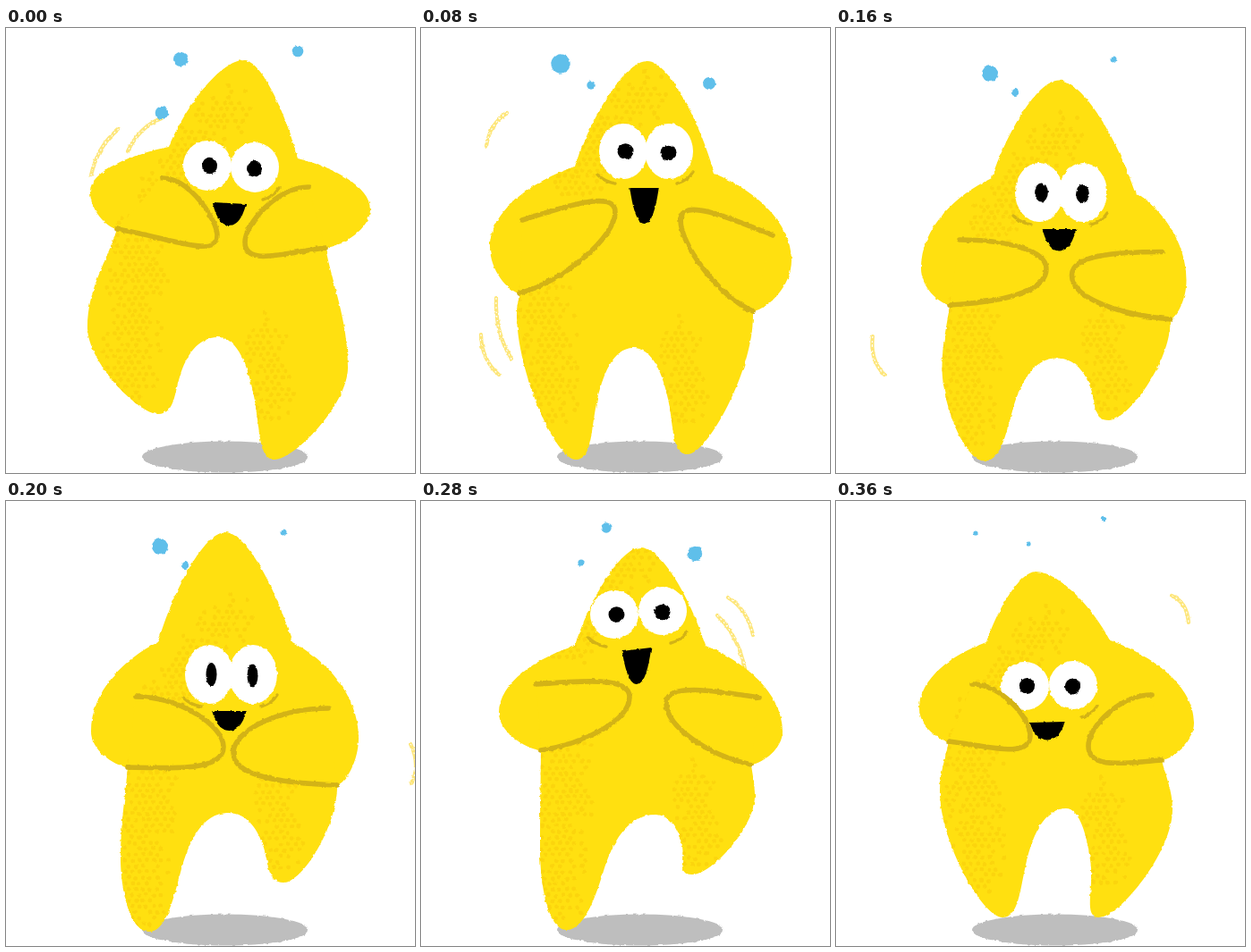
These frames come from a looping animation (457x498 px, 0.4 s). An HTML page:

```html
<!DOCTYPE html>
<html lang="en">
<head>
<meta charset="utf-8">
<title>Dancing star</title>
<style>
  html, body { margin: 0; width: 100%; height: 100%; overflow: hidden; background: #fff; }
  svg { display: block; width: 457px; height: 498px; }
  .flesh { fill: #ffe010; }
  .dots { fill: none; stroke: #fbd50d; stroke-width: 4.8; stroke-linecap: round; }
  .white { fill: #fff; }
  .black { fill: #000; }
  .line { fill: none; stroke: #d3b316; stroke-width: 5.6; stroke-linecap: round; stroke-linejoin: round; }
  .cheek { stroke-width: 3.4; }
  .drop { fill: #5fbfea; }
  .swish { fill: none; stroke: #fde67a; stroke-width: 4.2; stroke-linecap: round; }
  .core { fill: none; stroke: #fff; stroke-width: 1.2; stroke-dasharray: 2 3; }
</style>
</head>
<body>
<svg id="stage" viewBox="0 0 457 498">
  <filter id="rough" filterUnits="userSpaceOnUse" x="0" y="0" width="457" height="498" color-interpolation-filters="sRGB">
    <feTurbulence type="fractalNoise" baseFrequency=".2" numOctaves="2" seed="4"/>
    <feDisplacementMap in="SourceGraphic" scale="3" xChannelSelector="R" yChannelSelector="G"/>
  </filter>
  <g id="art" filter="url(#rough)">
    <ellipse cx="245" cy="480" rx="93" ry="17.5" fill="#bebebe"/>
  </g>
</svg>
<script>
const STEP = 40, COUNT = 10;
const art = document.getElementById('art');
const nums = s => s.split(/[ ,]+/).map(Number);
const points = s => s.split(' ').map(nums);

// mid: head tip, arch between the legs.
// left, right: shoulder, elbow, waist, hip, foot, start of hand line, fingertips, eye.
// face: eye height, pupil width, mouth depth.
const pose = (mid, left, right, face) => [points(mid), points(left), points(right), nums(face)];
const keys = {
  0: pose('266,36 237,346',
    '182,133 94,183 124,225 91,335 170,432 175,168 236,232 225,154',
    '326,146 407,203 357,246 382,380 300,483 338,178 267,240 278,156', '28 8.5 25'),
  2: pose('253,37 237,358',
    '172,155 77,245 110,297 107,320 173,483 113,215 217,206 226,138',
    '328,163 414,260 371,317 371,322 298,477 393,232 290,215 277,138', '31 9 40'),
  3: pose('253,82 246,390',
    '178,178 95,280 118,322 109,360 172,487 131,255 227,264 227,174',
    '348,209 389,300 377,334 377,338 300,451 369,269 273,271 276,174', '33 8.7 27'),
  5: pose('245,35 248,349',
    '170,158 95,258 136,298 128,400 160,482 145,219 243,275 227,194',
    '320,158 394,265 370,318 370,320 310,427 360,232 254,282 276,194', '33 6 22'),
  7: pose('246,52 262,351',
    '172,162 87,237 134,279 133,390 163,480 129,205 233,219 216,127',
    '318,162 404,258 369,295 373,330 303,418 378,220 274,226 270,123', '27 9 39'),
  8: pose('241,76 242,361',
    '162,183 82,270 122,321 120,385 162,480 133,242 229,268 214,167',
    '307,175 403,288 367,334 367,338 307,452 369,258 270,272 267,164', '27 9 30'),
  9: pose('223,79 257,344',
    '168,158 93,232 126,269 116,325 186,466 152,205 217,262 211,207',
    '306,156 400,248 364,290 376,345 294,466 353,217 282,274 265,206', '27 8.7 20')
};

// Drops hold for two steps: x, y, radius.
const drops = [
  '195,35,8 326,26,6.3 174,95,7.3',
  '156,40,10.7 190,64,4.7 322,62,7',
  '172,51,9 200,72,4 310,35,3.5',
  '207,30,5.7 179,69,3.6 306,59,8.2',
  '156,36,2.6 215,48,2.6 299,20,3.2'
].map(points);

// Motion lines by step: both ends; each bows away from the body.
const swishes = {
  0: '126,113,95,165 174,101,136,138',
  1: '110,104,84,148',
  2: '97,95,73,132 84,302,101,370 67,343,87,388',
  3: '382,235,392,318 419,274,417,333 52,343,66,387 69,314,89,378',
  4: '41,345,54,388',
  5: '452,272,453,316',
  7: '343,108,371,150 331,128,362,188',
  8: '362,106,386,147 341,118,375,178',
  9: '375,106,394,136'
};

const halfway = (a, b) => Array.isArray(a) ? a.map((v, i) => halfway(v, b[i])) : (a + b) / 2;
const mix = (a, b, u, v = u) => [a[0] + (b[0] - a[0]) * u, a[1] + (b[1] - a[1]) * v];
const move = ([x, y], dx, dy) => [x + dx, y + dy];
const bezier = ([first, ...rest]) => `M${first}C${rest.join(' ')}`;

function el(parent, tag, attrs) {
  const e = document.createElementNS('http://www.w3.org/2000/svg', tag);
  for (const k in attrs) e.setAttribute(k, attrs[k]);
  return parent.appendChild(e);
}
const path = (g, cls, d) => el(g, 'path', { class: cls, d });
const oval = (g, cls, [cx, cy], rx, ry = rx) => el(g, 'ellipse', { class: cls, cx, cy, rx, ry });

const kneeOf = (foot, arch, side) => move(mix(foot, arch, .5), side * 9, 0);

// Bezier points of one side, from the head tip round to the arch.
function half([tip, arch], [shoulder, elbow, waist, hip, foot], side) {
  const knee = kneeOf(foot, arch, side);
  const tx = (arch[0] - foot[0]) * .1, ty = (arch[1] - foot[1]) * .25;
  return [
    tip, mix(tip, shoulder, .32, 0), mix(tip, shoulder, .78, .54),
    shoulder, mix(shoulder, elbow, .5, .18), mix(shoulder, elbow, 1, .55),
    elbow, mix(elbow, waist, 0, .5), mix(elbow, waist, .6, .95),
    waist, mix(waist, hip, .3), mix(waist, hip, 1, .6),
    hip, mix(hip, foot, 0, .4), move(foot, side * 22, 0),
    foot, move(foot, side * -18, 0), move(knee, -tx, -ty),
    knee, move(knee, tx, ty), mix(arch, knee, .55, 0),
    arch
  ];
}

// From the wrist round the fingertips and back to the waist.
function handPath(from, tips, waist) {
  const rise = Math.abs(waist[1] - from[1]) * .3;
  const lift = Math.min(0, tips[1] - rise - from[1]) / 2;
  return bezier([
    from, move(mix(from, tips, .5, 0), 0, lift), move(tips, 0, -rise),
    tips, move(tips, 0, 27), move(mix(waist, tips, .5, .25), 0, 7), waist
  ]);
}

function mouthPath([lx, ly], [rx, ry], depth) {
  const x = (lx + rx) / 2 - 2, y = (ly + ry) / 2 + 41;
  const w = 23 - depth * .17, tilt = (ry - ly) / 2, low = y + depth, side = y + depth * .5;
  return `M${x - w} ${y - tilt}L${x + w} ${y + tilt}C${x + w - 3} ${side} ${x + w * .55} ${low} ${x} ${low}` +
    `C${x - w * .55} ${low} ${x - w + 3} ${side} ${x - w} ${y - tilt}Z`;
}

function swishPath([x1, y1, x2, y2]) {
  const x = (x1 + x2) / 2, y = (y1 + y2) / 2;
  const dx = x - 243, dy = y - 270, k = 11 / Math.hypot(dx, dy);
  return `M${x1} ${y1}Q${x + dx * k} ${y + dy * k} ${x2} ${y2}`;
}

function noise(x, y) {
  const v = Math.sin(x * 127.1 + y * 311.7) * 43758.5453;
  return v - Math.floor(v);
}

// Jittered dots around the segment a-b, thinning out towards radius r.
function speckle(a, b, r) {
  const dx = b[0] - a[0], dy = b[1] - a[1], len = dx * dx + dy * dy;
  let d = '';
  for (let j = -30; j <= 30; j++) {
    for (let i = -20; i <= 20; i++) {
      const x = (i + (j & 1) / 2) * 8 + noise(i, j) * 2;
      const y = j * 6.5 + noise(j, i + 9) * 2;
      const t = Math.max(0, Math.min(1, (x * dx + y * dy) / len));
      const far = Math.hypot(x - t * dx, y - t * dy) / r;
      if (far < 1 && noise(i + 5, j + 3) < 1.1 - far * .7) {
        d += `M${(a[0] + x).toFixed(1)} ${(a[1] + y).toFixed(1)}h.1`;
      }
    }
  }
  return d;
}

function draw(i) {
  const [mid, left, right, [eyeH, pupilW, depth]] = keys[i] || halfway(keys[i - 1], keys[i + 1]);
  const g = el(art, 'g', { visibility: 'hidden' });

  for (const s of swishes[i] ? points(swishes[i]) : []) {
    path(g, 'swish', swishPath(s));
    path(g, 'core', swishPath(s));
  }

  const body = bezier([...half(mid, right, 1), ...half(mid, left, -1).reverse().slice(1)]);
  path(g, 'flesh', body);
  el(el(g, 'clipPath', { id: 'body' + i }), 'path', { d: body });

  const [, , waist, hip, foot] = left;
  const eyeL = left[7], eyeR = right[7];
  const knee = kneeOf(right[4], mid[1], 1);
  path(g, 'dots',
    speckle(move(eyeL, 22, -64), move(eyeL, -50, 32), 29) +
    speckle(move(waist, 28, 12), move(mix(hip, foot, .6), -2, 0), 34) +
    speckle(move(knee, 10, -70), move(knee, 18, 0), 28)
  ).setAttribute('clip-path', `url(#body${i})`);

  path(g, 'line cheek', `M${move(eyeL, -29, 26)}Q${move(eyeL, -21, 34)} ${move(eyeL, -9, 36)}`);
  path(g, 'line cheek', `M${move(eyeR, 9, 36)}Q${move(eyeR, 21, 33)} ${move(eyeR, 27, 23)}`);
  oval(g, 'white', eyeL, 27, eyeH);
  oval(g, 'white', eyeR, 27, eyeH);
  oval(g, 'black', move(eyeL, 2.5, 0), pupilW, 78 / pupilW);
  oval(g, 'black', move(eyeR, -.5, 1.5), pupilW, 78 / pupilW);
  path(g, 'black', mouthPath(eyeL, eyeR, depth));

  for (const arm of [left, right]) {
    const d = handPath(arm[5], arm[6], arm[2]);
    path(g, 'flesh', d);
    path(g, 'line', d);
  }
  for (const [x, y, r] of drops[i >> 1]) oval(g, 'drop', [x, y], r);
  return g;
}

const cels = Array.from({ length: COUNT }, (_, i) => draw(i));
const start = performance.now();
let shown = 0;

function tick() {
  const i = Math.floor((performance.now() - start) / STEP) % COUNT;
  cels[shown].setAttribute('visibility', 'hidden');
  cels[i].setAttribute('visibility', 'visible');
  shown = i;
  requestAnimationFrame(tick);
}
tick();
</script>
</body>
</html>
```
